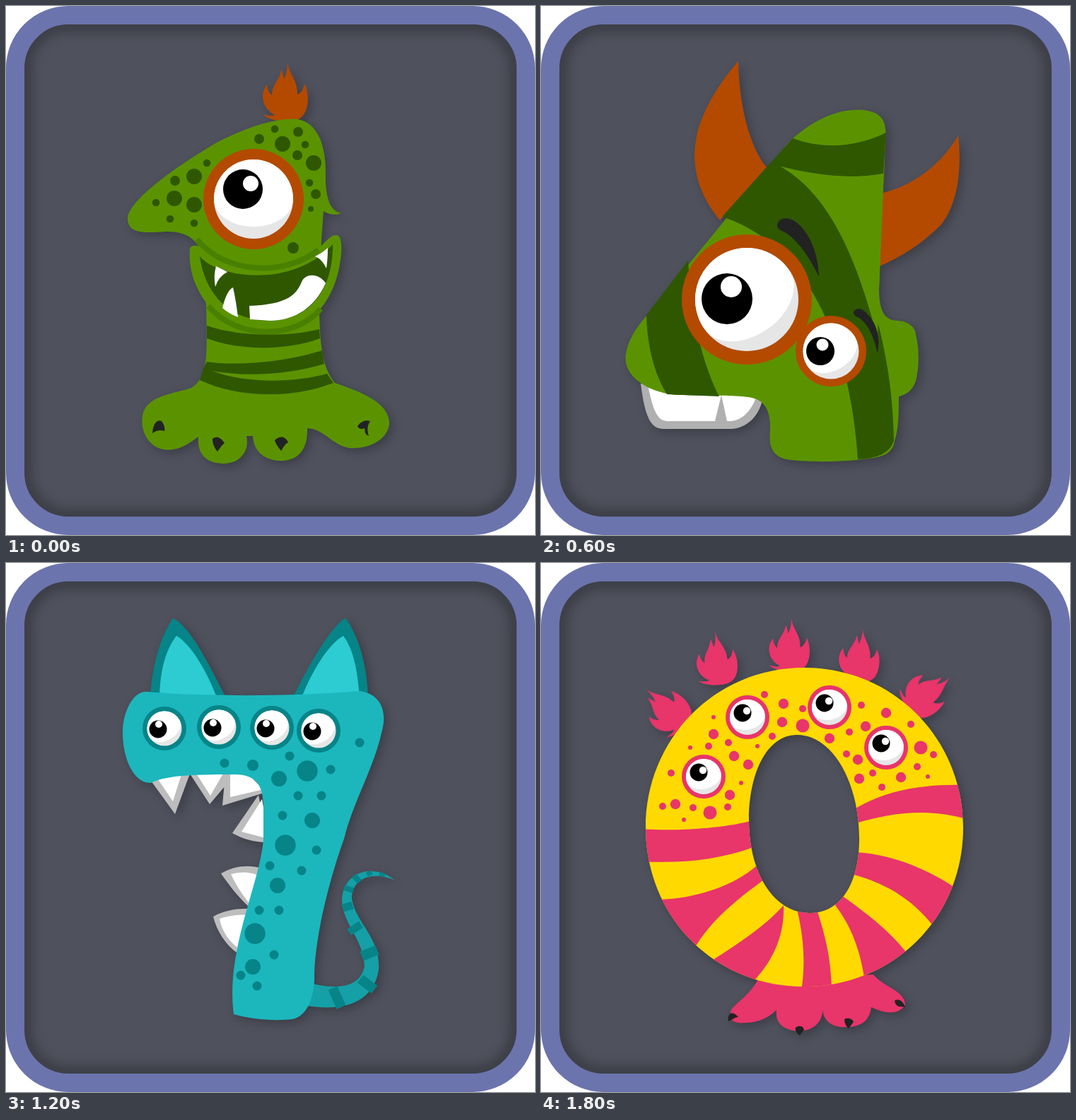
Animation of 748 by 748 pixels, one loop 2000 ms. Source, as an HTML page:

```html
<!DOCTYPE html>
<html lang="en">
<head>
<meta charset="utf-8">
<title>Monster numbers</title>
<style>
html, body { margin: 0; width: 100%; height: 100%; overflow: hidden; background: #fff; }
svg { display: block; width: 100%; height: 100%; }
#monsters g.monster { filter: drop-shadow(5px 5px 7px rgba(0, 0, 0, .24)); }
</style>
</head>
<body>
<svg viewBox="0 0 748 748">
  <clipPath id="ring"><path clip-rule="evenodd" d="M372 148C500 148 597 250 597 374C597 500 500 599 372 599C245 599 148 500 148 374C148 250 245 148 372 148ZM362 243C318 243 294 300 294 363C294 440 330 495 380 495C426 495 450 450 450 390C450 310 412 243 362 243Z"/></clipPath>
  <rect x="14" y="14" width="720" height="720" rx="74" fill="#4f515d"/>
  <rect x="27" y="27" width="694" height="694" rx="61" fill="none" stroke="#3d3f47" stroke-width="22" style="filter:blur(7px)"/>
  <rect x="13" y="13" width="722" height="722" rx="75" fill="none" stroke="#6b74ad" stroke-width="26"/>
  <g id="monsters"></g>
</svg>
<script>
const GREEN = '#5b9300', MOSS = '#2f5700', RUST = '#b34a00', ORANGE = '#ff5c22', PURPLE = '#82479b',
  RED = '#e81e24', WINE = '#700c2a', TEAL = '#1bb7bd', PINE = '#068488', PINK = '#e8356a',
  YELLOW = '#ffd900', INK = '#222', WHITE = '#fff';

const fill = (color, d) => `<path fill="${color}" d="${d}"/>`;
const line = (color, width, d, cap = 'butt') =>
  `<path fill="none" stroke="${color}" stroke-width="${width}" stroke-linecap="${cap}" d="${d}"/>`;
const disc = (color, x, y, r) => `<circle fill="${color}" cx="${x}" cy="${y}" r="${r}"/>`;
const oval = (color, x, y, rx, ry, turn) =>
  `<ellipse fill="${color}" rx="${rx}" ry="${ry}" transform="translate(${x} ${y})rotate(${turn})"/>`;

// Dots of one size; places are "x y, x y"
const dots = (color, r, places) =>
  places.split(',').map(p => disc(color, ...p.trim().split(' '), r)).join('');

// Ringed eye; pupil and glint are offsets from the centre, tilt turns the shading
const eye = (x, y, R, r, ring, [px, py, pr], [gx, gy, gr], tilt = 0) =>
  disc(ring, x, y, R) + disc('#e6e6e6', x, y, r) +
  `<path fill="#fff" transform="translate(${x} ${y})rotate(${tilt})" d="M${-r} 0A${r} ${r} 0 0 1 ${r} 0A${r} ${r * .7} 0 0 1 ${-r} 0Z"/>` +
  disc('#000', x + px, y + py, pr) + disc(WHITE, x + gx, y + gy, gr);

// Tuft of fire placed by its tip
const flame = (color, x, y, scale = 1, turn = 0) =>
  `<g transform="translate(${x} ${y})rotate(${turn})scale(${scale})">` + fill(color,
  'M0 0C1 18 15 26 14 47C20 45 23 38 24 32C30 42 31 62 24 74C18 84 8 85 -1 85C-15 85 -28 82 -35 75C-28 77 -22 78 -18 76C-32 70 -42 50 -29 33C-28 40 -27 44 -22 48C-23 34 -10 26 -9 12C-7 15 -6 20 -5 25C-1 18 0 10 0 0Z') + '</g>';

const fang = (left, right, top, x, y) =>
  `M${left} ${top}Q${(left + x) / 2 - 2} ${y - 12} ${x} ${y}Q${(right + x) / 2 + 4} ${y - 12} ${right} ${top}Z`;

const leg = (hip, knee, toe) =>
  line(RED, 13, `M${hip}L${knee}L${toe}`) + line(RED, 17, `M${knee}L${toe}`, 'round').replace('17', '14') + disc(RED, ...toe.split(' '), 10);

const smile = (x, y, rx, ry, turn, dx, dy) =>
  oval('#d62e4e', x, y, rx, ry, turn) + oval('#a51215', x + dx, y + dy, rx - 3, ry - 3, turn);

const one = () =>
  flame(RUST, 398, 78) +
  fill(GREEN, 'M412 160C440 165 452 195 452 235C451 265 456 290 474 293C465 297 455 294 449 290L446 330L443 430C444 480 447 510 465 533C500 545 542 560 542 590C540 615 510 627 485 625C460 620 450 598 426 597C427 625 415 643 388 643C360 642 350 625 349 608L340 608C345 630 330 647 308 647C280 647 270 630 272 609C255 622 240 630 222 627C200 622 190 600 193 580C197 550 240 548 262 540C285 525 285 500 283 425L275 345C268 330 255 318 225 319C190 322 172 320 172 300C175 270 260 215 300 192C340 172 380 158 412 160Z') +
  dots(MOSS, 11, '391 195,266 241,238 272,266 281,435 222') +
  dots(MOSS, 7, '358 188,413 178,412 211,239 247,438 266,406 342') +
  dots(MOSS, 5.3, '380 174,423 196,429 250,284 222,212 278,232 301,266 307') +
  dots(MOSS, 4, '431 287') + disc(MOSS, 406, 342, 8) +
  eye(350, 273, 71, 56, RUST, [-15, -14, 28], [-4, -22, 11]) +
  fill(GREEN, 'M260 343C262 337 272 338 276 342C300 370 400 380 440 345C455 330 460 323 468 324C475 325 476 345 472 365C465 410 435 462 370 462C300 462 255 400 260 343Z') +
  line('#4a8000', 8, 'M270 330C310 380 395 382 442 345M286 424C325 472 410 472 445 428') +
  fill(MOSS, 'M274 354C300 385 405 400 462 337C463 380 445 444 373 445C310 445 280 400 274 354Z') +
  fill(WHITE, 'M297 368L313 376Q300 383 296 397Q293 382 297 368ZM437 354Q446 350 455 342Q455 358 453 371Q447 358 437 354ZM306 427Q312 402 321 398Q325 415 328 440Q315 435 306 427ZM344 424C400 422 411 407 418 390C425 375 445 380 452 392C437 425 410 445 373 445L345 443Z') +
  fill(MOSS, 'M284 452C330 468 400 468 443 457L444 470C400 487 330 488 284 470ZM284 503C330 510 400 502 447 487L450 506C400 521 340 525 292 516C340 535 410 532 454 520L463 533C400 557 325 553 274 529L279 513Z') +
  fill(INK, 'M207 604C208 590 214 584 220 587C224 592 225 598 224 601C218 599 213 600 207 604ZM292 612C297 608 303 609 309 618C306 620 303 624 299 630C294 624 292 618 292 612ZM380 614C387 607 395 608 399 617C395 619 392 624 389 629C385 624 381 619 380 614ZM497 594C502 587 509 585 515 587C510 594 511 601 513 608C506 605 508 600 507 597C502 599 499 598 497 594Z');

const two = () =>
  fill(PURPLE, 'M147 255C120 245 95 215 96 198C98 186 112 188 120 200C135 220 145 240 147 255ZM147 258C125 268 95 268 80 258C74 247 85 240 100 241C115 242 135 248 147 258ZM150 260C138 280 118 296 95 298C88 295 92 282 105 272C118 263 135 259 150 260Z' +
    fang(187, 232, 574, 207, 628) + fang(247, 281, 574, 267, 604) + fang(300, 333, 574, 315, 603) + fang(355, 386, 572, 370, 603) +
    fang(389, 424, 572, 406, 607) + fang(436, 466, 574, 437, 603) + 'M477 593Q478 620 480 642Q490 640 515 612Z') +
  fill(ORANGE, 'M145 245C140 200 190 140 245 107C300 75 370 70 420 88C490 115 515 185 515 240C515 300 495 350 455 390C420 420 405 430 406 460Q440 485 480 473L565 608C550 618 520 617 500 610C460 590 440 576 380 576L190 577C150 577 140 550 147 535C155 510 200 475 235 440C290 380 330 325 327 265C325 225 290 215 250 235C200 265 175 275 155 270C148 265 147 258 145 245Z') +
  fill(PURPLE, 'M167 176C190 145 215 122 246 106C268 108 276 118 274 138C270 160 255 163 240 159C225 156 218 163 217 172C212 185 185 184 167 176Z') +
  fill(PURPLE, 'M382 80C440 85 480 120 503 175C490 173 485 172 478 174C465 175 460 168 459 160C452 150 445 151 438 148C425 145 427 140 425 130C420 115 400 122 385 118C365 112 362 95 368 86C372 81 376 80 382 80Z') +
  fill(PURPLE, 'M263 225C272 200 290 182 315 178C335 178 343 190 343 212C350 222 365 220 374 228C382 240 365 245 369 262C375 275 385 280 382 290C370 300 368 300 367 318C366 335 376 340 371 352C360 362 345 352 333 355C322 362 320 372 306 374L293 373C318 335 328 305 327 268C325 230 295 218 263 225Z') +
  fill(PURPLE, 'M494 336C480 365 465 385 444 401C435 398 435 390 430 383C420 376 410 380 408 370C408 352 430 350 433 340C425 330 408 322 408 304C412 285 430 280 445 283C470 290 480 315 494 336Z') +
  dots(PURPLE, 17, '295 467,225 530') + dots(PURPLE, 12, '262 504,312 516') +
  dots(PURPLE, 9, '295 425,341 446,234 480') + dots(PURPLE, 6.8, '372 447,182 535,287 546') + dots(PURPLE, 5.3, '329 492,334 541') +
  eye(544, 525, 84, 67, RUST, [-20, -17, 33], [-6, -27, 13], 4) +
  eye(400, 514, 59, 46, RUST, [-13, -13, 23], [-4, -18, 9.5], 4);

const three = () => {
  const body = 'M215 180C270 105 455 115 455 225C455 305 395 335 325 340C425 345 490 395 480 480C470 600 290 620 205 545';
  return flame(PINK, 350, 77, .85) + line(YELLOW, 110, body, 'round') +
    dots(PINK, 13, '250 175,452 470,300 555') + dots(PINK, 8, '285 145,410 185,440 245,405 540,250 555,475 430') +
    eye(375, 220, 62, 49, PINK, [-12, -10, 24], [-4, -18, 9]) +
    fill('#6e260e', 'M340 430Q400 470 455 420Q450 510 390 505Q350 490 340 430Z') + fill(WHITE, fang(360, 385, 445, 374, 473) + fang(410, 435, 447, 422, 473));
};

const four = () =>
  fill(RUST, 'M279 78C280 140 295 200 319 228L253 303C225 270 212 230 219 190C225 150 255 105 279 78ZM590 183C595 230 590 280 565 310C540 335 510 355 478 368L480 265C525 255 565 225 590 183Z') +
  fill('#b0b0b0', 'M141 534C148 590 158 598 175 598L270 598C295 596 310 575 313 556L240 530Z') +
  fill(WHITE, 'M152 540C160 580 168 587 180 587L265 587C285 588 298 570 304 554L240 530Z') +
  fill('#b0b0b0', 'M255 550L246 587L263 587Z') +
  fill(GREEN, 'M350 193C385 160 420 145 455 147C480 150 490 160 487 190L478 400C478 430 485 445 505 445C520 446 530 455 530 465C535 485 535 510 530 530C525 545 515 550 506 552C506 580 505 600 500 615C497 635 480 638 455 641C420 645 380 645 355 642C325 640 322 620 324 600C325 575 318 562 305 556C285 548 230 552 190 550C145 545 115 520 120 492C125 465 140 450 150 437Z') +
  fill(MOSS, 'M356 187C400 203 445 200 488 179L484 237C435 246 385 238 339 227C420 270 495 420 499 614C493 635 470 640 448 641C440 520 400 345 256 298L318 229ZM208 360C212 430 225 500 252 552L178 549C160 520 150 480 149 437Z') +
  fill(GREEN, 'M339 227C385 240 435 246 484 237L478 400L476 470C445 350 405 265 339 227Z') +
  eye(291, 415, 92, 73, RUST, [-28, -1, 36], [-22, -18, 15], -35) +
  eye(410, 488, 50, 39.5, RUST, [-15, 0, 20], [-12, -9, 8.5], -30) +
  fill(INK, 'M334 309C337 298 350 298 360 305C380 320 392 350 393 383C380 355 362 330 345 320C338 317 334 315 334 309ZM442 432C448 425 455 428 462 436C475 450 480 468 476 491C470 465 462 450 450 441C445 439 441 437 442 432Z');

const five = () =>
  leg('213 155', '178 128', '200 96') + leg('281 142', '274 91', '316 90') + leg('197 238', '157 237', '166 195') +
  leg('195 340', '160 342', '162 302') + leg('221 402', '207 430', '173 404') + leg('204 556', '158 564', '158 524') +
  leg('244 600', '227 636', '190 613') + leg('304 610', '323 640', '286 657') + leg('526 362', '567 338', '542 306') +
  leg('553 446', '585 445', '573 404') + leg('538 519', '566 538', '585 502') + leg('497 570', '514 601', '548 577') +
  fill(RED, 'M215 143C260 133 340 140 375 127L430 265C370 258 298 255 298 285C305 312 400 305 450 314C530 330 558 390 558 445C555 550 470 616 370 616C290 616 230 600 208 577C190 560 188 535 200 515C215 490 250 488 280 502C305 512 340 516 358 512C375 505 377 485 376 465C374 430 345 420 310 418C255 415 200 415 191 365C185 325 195 250 197 220C200 180 200 150 215 143Z') +
  disc(WINE, 311, 574, 14) + dots(WINE, 10, '234 172,513 499,362 147,346 236,536 438,280 577,342 591,460 571') +
  dots(WINE, 7.7, '207 347,236 384,522 391,373 243,338 338,342 390,410 380,444 471,482 479,478 532,241 518,306 544,242 560,263 241,369 363,358 525,408 418') +
  dots(WINE, 5, '222 215,234 241,209 249,213 196,225 278,271 278,271 151,337 149,368 216,295 253,319 254,306 315,323 354,374 338,384 397,312 397,425 352,496 358,545 410,505 459,508 529,455 503,425 479,388 498,431 433,222 539,276 551,348 557,297 598,359 170') +
  smile(299, 195, 53, 38, 5, 6, -3) + smile(264, 342, 34, 55, -32, 5, -3) + smile(469, 405, 36, 55, -36, 5, -3) + smile(408, 547, 52, 40, -43, 5, -3) +
  fill(WHITE, 'M318 189L321 172Q345 157 355 191ZM333 204L356 201Q356 210 350 214ZM243 297C255 287 280 295 283 303C288 325 278 335 268 332Q251 328 243 297ZM271 376Q292 358 303 364Q307 382 298 389Q288 391 271 376ZM234 313Q239 318 238 331Q232 327 234 313Z') +
  fill(WHITE, 'M436 382C435 353 465 350 483 371Q462 382 453 404Q440 397 436 382ZM490 406L508 390Q516 408 511 424ZM460 434Q474 420 494 451Q475 452 460 434ZM405 533Q399 514 425 500Q444 500 448 507Q430 533 412 535ZM371 548Q385 545 401 548Q391 563 387 586Q365 583 371 548ZM432 545Q445 533 455 534Q454 543 449 550Q440 552 432 545Z') +
  eye(469, 173, 97, 76, WINE, [14, -1, 38], [28, 10, 15.5], -25);

const six = () =>
  flame(ORANGE, 425, 78, .8, 20) +
  line(PURPLE, 108, 'M435 165C330 150 245 275 245 430C245 625 490 630 490 450C490 325 320 300 250 410', 'round') +
  dots(ORANGE, 12, '250 300,470 525,270 520') + dots(ORANGE, 7, '290 220,330 185,230 365,300 560,430 575,500 430') +
  eye(405, 175, 58, 46, ORANGE, [-11, -9, 23], [-3, -16, 9]) +
  fill(INK, 'M310 548Q370 585 430 545Q420 605 370 605Q320 600 310 548Z') + fill(WHITE, fang(330, 355, 559, 343, 584) + fang(385, 410, 561, 398, 584));

const grin = d => fill('#bdbdbd', d);
const seven = () =>
  fill(PINE, 'M204 188C207 145 218 105 236 78C262 90 290 150 311 190ZM512 188C510 145 500 105 480 78C460 88 425 150 406 190Z') +
  fill('#2cccd2', 'M217 190C218 155 224 125 241 103C262 115 285 155 298 190ZM500 190C497 155 493 125 477 103C455 115 432 155 418 190Z') +
  grin('M205 308L239 355L260 298ZM260 298L288 341L310 315L313 298ZM310 298L306 343L365 325L340 296ZM320 382L357 328L370 395C350 395 335 390 320 382ZM304 439C325 427 345 427 362 432L348 490C330 475 315 455 304 439ZM293 500C310 490 330 488 350 489L328 552C310 540 298 520 293 500Z') +
  fill(WHITE, 'M213 303L236 337L249 296ZM268 296L289 329L308 296ZM317 298L317 331L364 320L340 296ZM333 380L362 334L372 390ZM318 440C335 435 350 438 360 443L346 484C335 470 325 455 318 440ZM302 503C320 497 335 497 348 498L329 545C315 535 305 520 302 503Z') +
  fill('#14a0a6', 'M425 593C460 602 500 605 507 570C505 530 475 510 475 475C478 435 520 425 549 448C520 435 488 445 489 475C495 510 530 530 527 575C520 620 480 635 425 626Z') +
  line(PINE, 14, 'M462 601L474 628M501 588L521 603M503 556L525 547') + line(PINE, 11, 'M485 522L502 511M476 488L490 484') + line(PINE, 8, 'M478 459L491 463M492 442L500 451M513 436L515 442M533 438L531 443') +
  fill(TEAL, 'M200 182C260 188 400 190 500 181C530 185 540 210 531 240C520 290 490 340 478 390C460 440 438 520 436 580C437 610 428 640 405 645C380 648 345 645 322 638C317 600 322 560 335 510C350 455 362 420 364 390L364 345C364 310 350 300 325 299C290 299 230 298 205 311C180 312 165 275 165 240C165 210 180 180 200 182Z') +
  dots(PINE, 14.7, '426 294,395 399,352 524') + dots(PINE, 11, '386 305,433 364,384 456,349 571') + dots(PINE, 8, '349 286') +
  dots(PINE, 6.5, '309 283,401 273,459 292,500 254,413 329,446 329,391 357,439 406,373 428,418 435,358 491,386 491,379 554,332 583,355 598') +
  [[224, 234], [301, 232], [376, 233], [442, 237]].map(([x, y]) => eye(x, y, 31, 24.5, PINE, [-9, 1, 12.5], [-8, -6, 5], -30)).join('');

const eight = () =>
  flame(PINK, 372, 77, .8) +
  '<g fill="none" stroke="' + GREEN + '" stroke-width="92"><ellipse cx="374" cy="245" rx="92" ry="78"/><ellipse cx="374" cy="470" rx="125" ry="120"/></g>' +
  dots(MOSS, 12, '260 420,490 510,300 565') + dots(MOSS, 7, '240 470,265 525,350 600,430 575,505 450,285 225,465 245,450 205') +
  eye(320, 195, 42, 33, RUST, [-7, -6, 16], [-2, -11, 6]) + eye(420, 195, 42, 33, RUST, [-7, -6, 16], [-2, -11, 6]) +
  fill(MOSS, 'M320 330Q374 355 430 330Q425 385 374 386Q326 382 320 330Z') + fill(WHITE, fang(340, 360, 338, 350, 362) + fang(390, 410, 338, 400, 362));

const gape = 'M397 362C420 365 433 390 433 415C433 445 412 463 388 463C362 463 345 448 345 425C345 395 375 360 397 362Z';
const nine = () =>
  flame(ORANGE, 356, 76, .75) + line(RUST, 10, 'M363 190C349 168 367 158 370 137') +
  fill(ORANGE, 'M408 304C470 305 512 350 511 415C510 480 460 550 430 590C410 615 390 640 360 640C325 645 300 635 303 612C310 585 345 570 348 550C350 535 335 530 300 528C245 520 232 490 231 440C228 360 270 310 340 306Z') +
  dots(RUST, 9.2, '337 328,402 333,341 375,442 351') + dots(RUST, 6.5, '365 340,312 381,453 330') +
  dots(RUST, 4.8, '312 335,317 349,300 362,337 354,382 330,374 357,411 352,428 321,446 390,319 414') +
  eye(371, 250, 65, 51, RUST, [6, 0, 26], [16, -7, 10.5], 6) +
  fill(RUST, 'M317 237C350 228 390 228 424 237L420 210C400 185 340 185 322 210Z') +
  `<g transform="translate(0 11)">${fill('#f2b35b', gape)}</g>` + fill('#6e260e', gape) +
  fill(WHITE, 'M366 375C378 363 395 360 408 364C412 380 416 400 416 415C412 418 408 417 403 420C390 428 372 428 367 415C365 400 364 388 366 375Z') +
  fill(RUST, 'M348 549L431 590L408 616C380 603 358 583 346 558ZM340 567C350 596 368 615 393 628L377 638C350 622 336 600 332 576ZM317 592C322 614 335 630 354 640L338 641C320 625 314 610 313 596ZM307 600C308 620 315 632 325 640L314 636C306 627 303 615 303 608Z') +
  fill(RUST, 'M341 630L357 630C357 645 358 655 355 666C345 670 335 665 327 665C323 655 330 652 342 655ZM369 630L383 630L385 643C392 640 400 645 401 651C395 655 380 656 370 655Z');

const zero = () =>
  flame(PINK, 148, 178, .9, -48) + flame(PINK, 246, 96, .9, -7) + flame(PINK, 354, 77, .9) + flame(PINK, 455, 92, .9, 3) + flame(PINK, 580, 161, .9, 52) +
  fill(PINK, 'M308 586C300 605 285 615 270 630C262 648 275 652 290 650C310 650 325 640 333 632C330 655 350 662 367 662C385 660 398 650 398 632C400 650 415 658 435 656C455 655 465 645 467 628C485 637 505 640 515 625C515 605 485 600 470 582Z') +
  fill(INK, 'M265 648C263 637 270 632 279 642C275 642 270 646 265 648ZM360 657C365 653 371 655 372 660L366 668C361 665 359 661 360 657ZM429 645C434 642 441 645 442 649L435 658C431 655 429 650 429 645ZM500 619C505 615 512 619 515 628C508 627 502 629 500 619Z') +
  '<g clip-path="url(#ring)"><rect x="140" y="140" width="465" height="465" fill="' + YELLOW + '"/>' +
  fill(PINK, 'M140 376C190 380 260 375 300 364L300 402C250 420 200 425 140 422ZM165 476C220 475 275 455 305 428L315 448C285 470 245 500 220 540L190 560ZM240 563C285 535 320 510 343 484C345 530 325 565 302 590L280 615ZM362 490C372 530 374 570 368 605L411 605C410 560 403 530 390 490ZM416 484C440 515 452 550 458 592L525 562C500 525 460 495 425 470ZM440 440C495 455 530 480 560 520L590 462C550 435 500 412 445 409ZM440 350C480 325 530 312 600 314L602 362C540 345 490 355 445 368Z') +
  '</g>' +
  dots(PINK, 9.5, '239 353,370 230,537 261') + dots(PINK, 7.2, '244 242,343 199,408 248,448 278,450 305,293 285,267 328,190 341,273 273,509 303,488 212,459 231,341 225') +
  dots(PINK, 5, '184 297,172 344,215 346,264 345,316 186,327 245,265 254,237 259,370 206,453 201,436 239,432 270,469 297,482 317,532 288,555 271,523 228') +
  dots(PINK, 3, '211 261,244 218,202 363,306 259,283 311,547 302') +
  [[230, 302], [292, 218], [408, 204], [488, 261]].map(([x, y]) => eye(x, y, 31, 25, PINK, [-7, -6, 12.5], [-1, -9, 5.2], -15)).join('');

const stage = document.getElementById('monsters');
stage.innerHTML = [one, two, three, four, five, six, seven, eight, nine, zero]
  .map(draw => `<g class="monster">${draw()}</g>`).join('');

const STEP = 200;
const start = performance.now();
function show() {
  const now = Math.floor((performance.now() - start) / STEP) % 10;
  [...stage.children].forEach((monster, i) => monster.style.display = i === now ? '' : 'none');
  requestAnimationFrame(show);
}
show();
</script>
</body>
</html>
```
